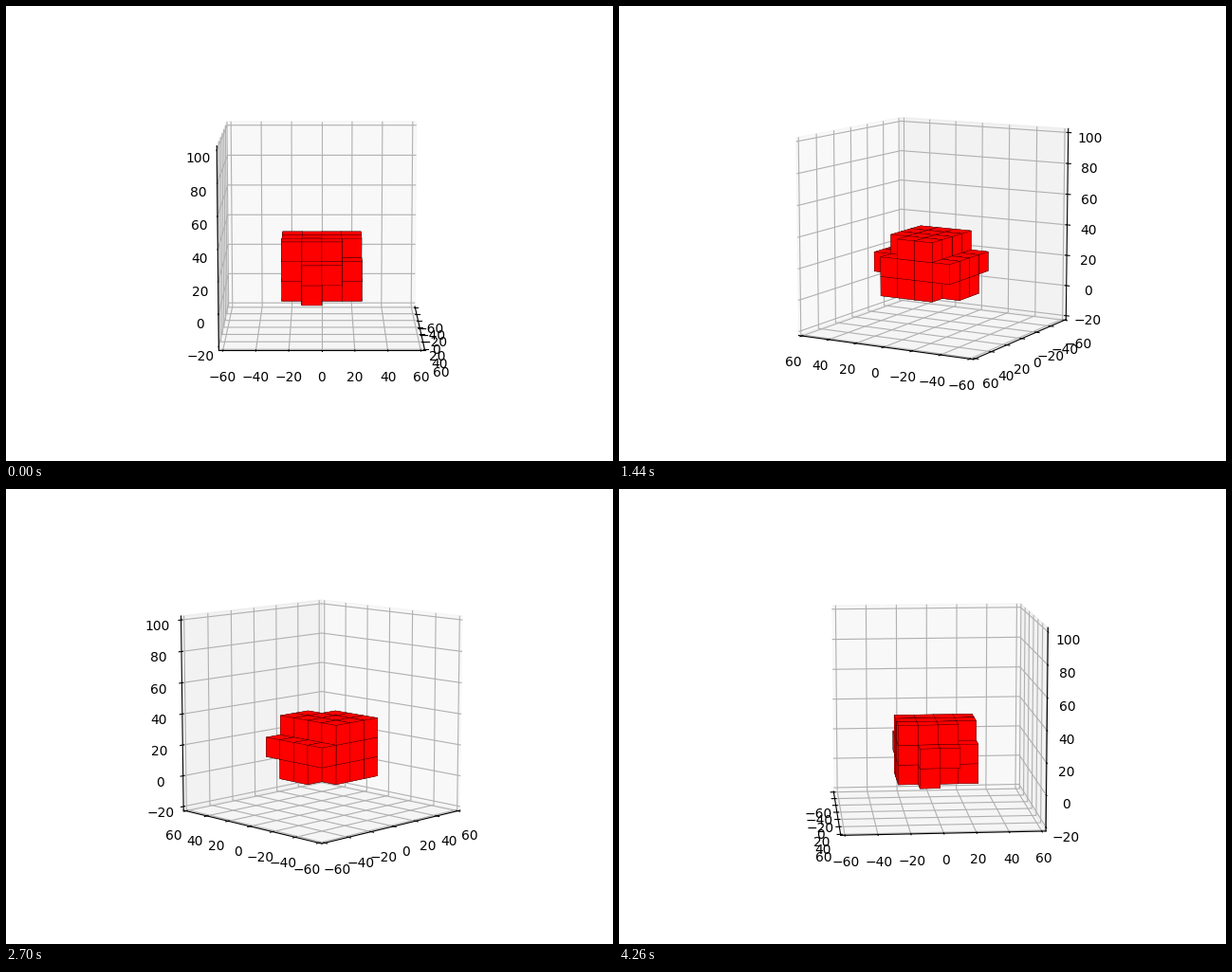
A matplotlib script for the animation above (4.32 s loop, 640 by 480 pixels).

```python
import itertools

import matplotlib.pyplot as plt
import numpy as np
from matplotlib.animation import FuncAnimation
from mpl_toolkits.mplot3d.art3d import Poly3DCollection

SIZE = 12.5      # edge of one voxel
STEPS = 72       # views per full turn
INTERVAL = 60    # ms per view
MARGIN = 2.5     # room beyond the outermost ticks


def block(xs, ys, z):
    return set(itertools.product(xs, ys, [z]))


def cube_faces(cell):
    """The six squares around one grid cell."""
    low = np.array(cell) * SIZE
    faces = []
    for axis, side in itertools.product(range(3), (0, 1)):
        face = np.zeros((4, 3))
        face[:, axis] = side
        face[:, (axis + 1) % 3] = [0, 1, 1, 0]
        face[:, (axis + 2) % 3] = [0, 0, 1, 1]
        faces.append(low + face * SIZE)
    return faces


core, width = range(-1, 2), range(-2, 2)
bottom = block(core, width, 0) | {(-2, -1, 0), (-2, 0, 0), (2, -1, 0)}
middle = block(range(-2, 2), width, 1) | {(2, -1, 1), (2, 0, 1)}
top = block(core, width, 2) - {(1, 1, 2)}
cells = sorted(bottom | middle | top)

fig = plt.figure(figsize=(6.4, 4.8), dpi=100)
ax = fig.add_subplot(projection="3d")
ax.add_collection3d(Poly3DCollection(
    [face for cell in cells for face in cube_faces(cell)],
    facecolors="red", edgecolors="black", linewidths=0.2))

for name, low, high in (("x", -60, 60), ("y", -60, 60), ("z", -20, 100)):
    ax.set(**{name + "ticks": np.arange(low, high + 1, 20),
              name + "lim": (low - MARGIN, high + MARGIN)})

# Scale the box so that 120 units span exactly one view unit.
ax.set_box_aspect((1, 1, 1), zoom=np.sqrt(3) / 1.8294640721620434)


def turn(step):
    # A tiny offset keeps the wall choice stable in edge-on views.
    azim = 360 / STEPS * step * (1 - 1e-7) + 1e-6
    ax.view_init(elev=10, azim=azim)
    return []


anim = FuncAnimation(fig, turn, frames=STEPS, interval=INTERVAL,
                     repeat=True, repeat_delay=0, blit=False)
plt.show()
```
